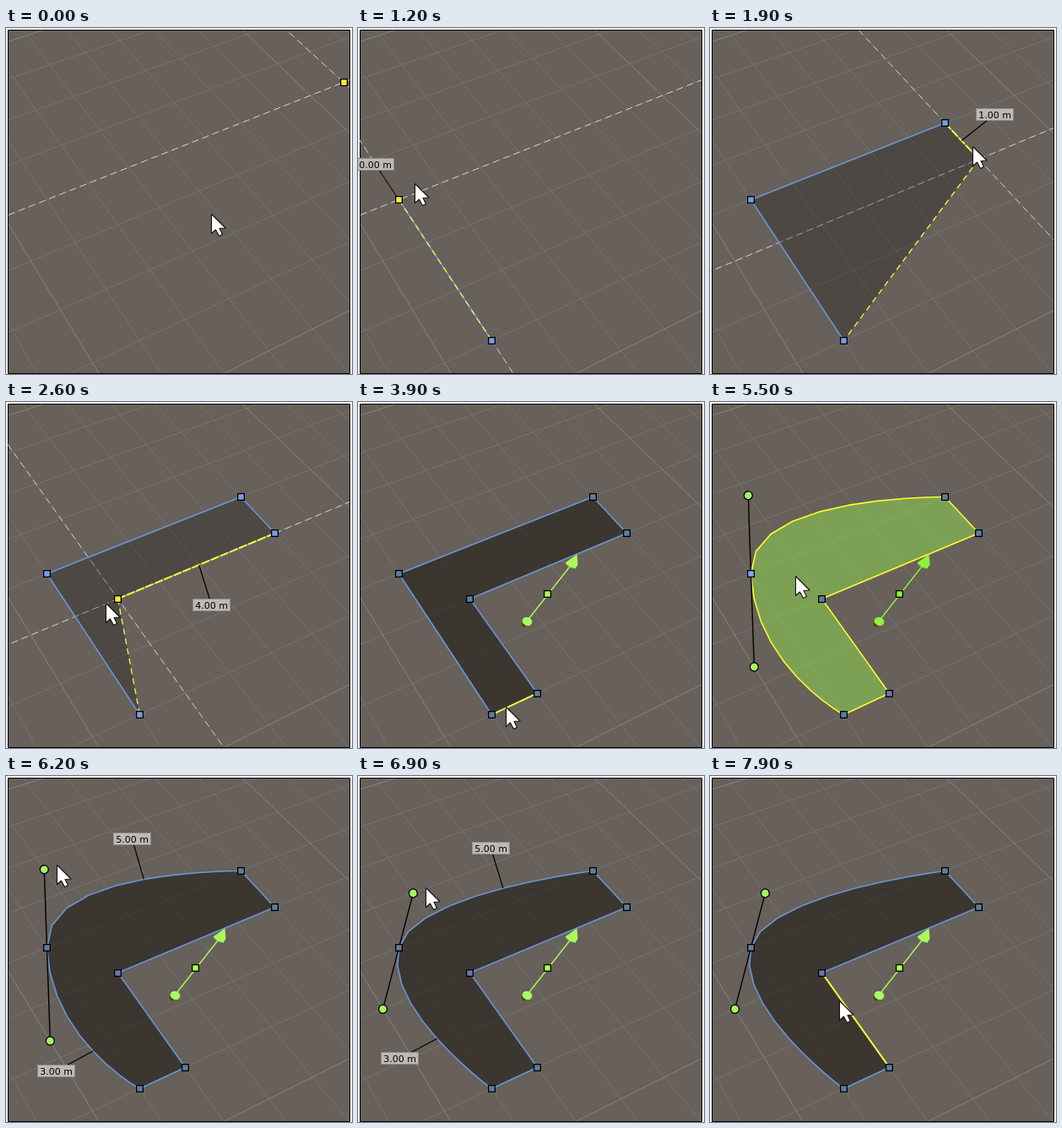
Animation of 410 by 410 pixels, one loop 8 s. Source, as an HTML page with a canvas:

```html
<!DOCTYPE html>
<html lang="en">
<head>
<meta charset="utf-8">
<title>Drawing and bending a shape</title>
<style>
  html, body { margin: 0; height: 100%; overflow: hidden; background: #fff; }
  canvas { display: block; }
</style>
</head>
<body>
<canvas id="stage" width="410" height="410"></canvas>
<script>
const ctx = document.getElementById('stage').getContext('2d');
const LOOP = 8000, STEP = 100, CLOSED = 3900, BENT = 5300;
const BLUE = '#6b95d6', YELLOW = '#fbfb30', VERTEX = '#5e7da5', BRIGHT = '#75a0e6';

// Ground plane in metres -> screen pixels
function project([u, v]) {
  const w = 1 + 0.016926 * u - 0.04199 * v;
  return [(48 + 50.705 * u + 30.032 * v) / w, (203 - 16.304 * u + 40.13 * v) / w];
}

const clamp01 = k => Math.min(1, Math.max(0, k));
const mix = (a, b, k) => a.map((value, i) => value + (b[i] - value) * k);

// Corners in metres, with the times the pointer leaves for and reaches each one
const START = [8, 0];
const legs = [
  { to: [0, 3], leave: 0, arrive: 400 },
  { to: [0, 0], leave: 600, arrive: 1000 },
  { to: [5, 0], leave: 1200, arrive: 1400 },
  { to: [5, 1], leave: 1800, arrive: 2000 },
  { to: [1, 1], leave: 2000, arrive: 2300 },
  { to: [1, 3], leave: 2700, arrive: 3100 },
  { to: [0, 3], leave: 3400, arrive: 3700 }
];
const plan = legs.slice(0, 6).map(leg => leg.to);
const corners = plan.map(project);

// The pointer runs slightly past each snapped corner
const sketchStops = legs.flatMap(({ to, leave, arrive }, i) => {
  const from = i ? legs[i - 1].to : START;
  const next = legs[i + 1] ? legs[i + 1].leave : 3800;
  const place = project(mix(from, to, i ? 1.07 : 1));
  return [[arrive, ...place], [Math.max(arrive, next - 50), ...place]];
});

// time, x, y
const pointerStops = [
  [0, 243, 220], ...sketchStops, [3900, 175, 361],
  [4700, 50, 204], [BENT, 50, 204], [5500, 101, 206], [5900, 60, 105], [6200, 60, 105],
  [6600, 124, 115], [6700, 124, 115], [6900, 80, 132], [7200, 80, 132], [7600, 153, 266]
];

function pointerAt(t) {
  const i = pointerStops.findIndex(stop => stop[0] > t);
  if (i < 0) return pointerStops[pointerStops.length - 1].slice(1);
  const [t0, ...from] = pointerStops[i - 1], [t1, ...to] = pointerStops[i];
  const k = (t - t0) / (t1 - t0);
  return mix(from, to, k * k * (3 - 2 * k));
}

function trace(points, closed) {
  ctx.beginPath();
  points.forEach(p => ctx.lineTo(...p));
  if (closed) ctx.closePath();
}

function stroke(points, color, width = 1, dash = []) {
  trace(points);
  ctx.setLineDash(dash);
  ctx.strokeStyle = color;
  ctx.lineWidth = width;
  ctx.stroke();
  ctx.setLineDash([]);
}

function fill(points, color) {
  trace(points, true);
  ctx.fillStyle = color;
  ctx.fill();
}

function dot([x, y], rx, ry, color) {
  ctx.beginPath();
  ctx.ellipse(x, y, rx, ry, 0.3, 0, Math.PI * 2);
  ctx.fillStyle = color;
  ctx.fill();
}

function square(point, color) {
  const [x, y] = point.map(Math.round);
  ctx.fillStyle = '#000';
  ctx.fillRect(x - 4.5, y - 4.5, 9, 9);
  ctx.fillStyle = color;
  ctx.fillRect(x - 3.2, y - 3.2, 6.4, 6.4);
}

function knob([x, y]) {
  dot([x, y], 5.6, 5.6, '#000');
  dot([x, y], 4.3, 4.3, '#a6f268');
}

// Stands off the outer side of a stretch; an empty stretch continues the one before
function label(anchor, from, to, before, metres) {
  const empty = metres === 0;
  const base = empty ? before : from, end = empty ? from : to;
  const angle = Math.atan2(end[1] - base[1], end[0] - base[0]) - (empty ? 0 : Math.PI / 2 - 0.09);
  const x = Math.round(anchor[0] + 50 * Math.cos(angle));
  const y = Math.round(anchor[1] + 50 * Math.sin(angle));
  stroke([anchor, [x, y]], '#000', 1.2);
  ctx.fillStyle = '#bcb9b6';
  ctx.fillRect(x - 22.5, y - 7.5, 45, 15);
  ctx.strokeStyle = '#8f8b87';
  ctx.lineWidth = 1;
  ctx.strokeRect(x - 22, y - 7, 44, 14);
  ctx.fillStyle = '#000';
  ctx.font = '11px "DejaVu Sans", sans-serif';
  ctx.textAlign = 'center';
  ctx.fillText(metres.toFixed(2) + ' m', x, y + 4);
}

function gridLine(n, alongU, color, dash) {
  const ends = [-7, 14].map(k => project(alongU ? [k, n] : [n, k - 5]));
  stroke(ends, color, 1, dash);
}

function drawInside(left, draw) {
  ctx.save();
  ctx.beginPath();
  ctx.rect(left, 2.5, 406.5 - left, 406);
  ctx.clip();
  draw();
  ctx.restore();
}

function drawGround() {
  ctx.fillStyle = '#fff';
  ctx.fillRect(-1, -1, 411, 411);
  ctx.fillStyle = '#67605b';
  ctx.fillRect(2, 2, 405, 407);
  const shade = major => major ? 'rgba(158,162,160,.55)' : 'rgba(140,146,145,.36)';
  drawInside(2.5, () => {
    for (let n = -7; n <= 12; n++) {
      gridLine(n, false, shade((n + 1) % 8 === 0));
      gridLine(n, true, shade((n + 4) % 8 === 0));
    }
  });
  ctx.strokeStyle = '#000';
  ctx.lineWidth = 1;
  ctx.strokeRect(2, 2, 405, 407);
}

function drawSketch(t) {
  const count = legs.filter(leg => leg.leave <= t).length - 1;
  const { to, leave, arrive } = legs[count];
  const from = count ? legs[count - 1].to : START;
  const snapped = mix(from, to, clamp01((t - leave) / (arrive - leave))).map(Math.round);
  const current = project(snapped);
  const placed = corners.slice(0, count);

  drawInside(-0.5, () => {
    gridLine(snapped[0], false, '#d5d2ce', [8, 5]);
    gridLine(snapped[1], true, '#d5d2ce', [8, 5]);
  });
  if (count > 1) fill([...placed, current], 'rgba(0,0,0,.25)');
  stroke(placed, BLUE, 1.5);
  if (count) {
    const last = placed[count - 1];
    const metres = Math.hypot(snapped[0] - from[0], snapped[1] - from[1]);
    stroke([current, placed[0]], YELLOW, 1.3, [7, 5]);
    stroke([last, current], BLUE, 1.5);
    stroke([last, current], YELLOW, 2, [10, 2]);
    label(project(mix(from, snapped, 0.5)), last, current, placed[count - 2] || current, metres);
  }
  placed.forEach(p => square(p, BRIGHT));
  square(current, '#f8ed38');
}

// Bent side in ten straight pieces, curved on the ground; the far control point is the end itself
function bentSide(start, control, end) {
  return Array.from({ length: 11 }, (_, i) => {
    const k = i / 10;
    const a = mix(start, control, k), b = mix(control, end, k);
    return project(mix(mix(a, b, k), mix(b, end, k), k));
  });
}

function drawHeightHandle(color) {
  stroke([[199, 260], [254, 190]], color, 1.4);
  dot([197, 261], 3.5, 5, '#3b4d20');
  dot([200, 259.5], 6, 5, color);
  fill([[259, 180], [260, 192], [257, 197], [250, 195], [245, 190]], color);
  stroke([[245, 191], [250, 196], [257, 197]], '#6e9e35');
  square([224, 227], color);
}

function drawShape(t) {
  const hovered = (t >= 4100 && t < 4700) || (t >= BENT && t < 5800);
  const bent = t >= BENT;
  const [bottom, pivot, top] = plan;
  const pull = [t >= 6500 && t < 6900 ? 2 : 1, t < 6300 ? -5 / 3 : -1];
  const push = pull.map(value => -value);
  const knobs = [pull, push].map(project);
  const upper = bentSide(pivot, pull, top);
  const lower = bentSide(pivot, push, bottom).reverse();
  const outline = bent ? [...lower, ...upper, ...corners.slice(3)] : corners;

  fill(outline, hovered ? 'rgba(140,205,80,.6)' : 'rgba(22,18,10,.53)');
  stroke([...outline, outline[0]], hovered ? YELLOW : BLUE, 1.6);
  if (t < 4100) stroke([corners[5], corners[0]], YELLOW, 1.9);
  if (t >= 7600) stroke([corners[4], corners[5]], YELLOW, 1.9);

  drawHeightHandle(hovered ? '#92f038' : '#abfa5c');
  if (bent) stroke(knobs, '#000', 1.4);
  corners.forEach((p, i) => square(p, i === 1 && t >= 4800 && t < 5900 ? '#80aaf4' : VERTEX));
  if (bent) knobs.forEach(knob);
  if (t >= 5900 && t < 7200) {
    label(upper[5], corners[1], corners[2], corners[0], 5);
    label(lower[5], corners[0], corners[1], corners[5], 3);
  }
}

function drawPointer(point) {
  const [x, y] = point.map(Math.round);
  const arrow = [[0, 0], [0, 23], [5, 18.5], [9, 26], [13, 24], [9.5, 17], [16.5, 16.5]]
    .map(([dx, dy]) => [x + dx, y + dy]);
  fill(arrow, '#fff');
  stroke([...arrow, arrow[0]], '#111', 1.1);
}

function frame() {
  const t = Math.floor(((performance.now() - began) % LOOP) / STEP) * STEP;
  ctx.setTransform(1, 0, 0, 1, 0.5, 0.5);
  ctx.lineJoin = 'round';
  drawGround();
  if (t < CLOSED) drawSketch(t);
  else drawShape(t);
  drawPointer(pointerAt(t));
  requestAnimationFrame(frame);
}

const began = performance.now();
frame();
</script>
</body>
</html>
```
